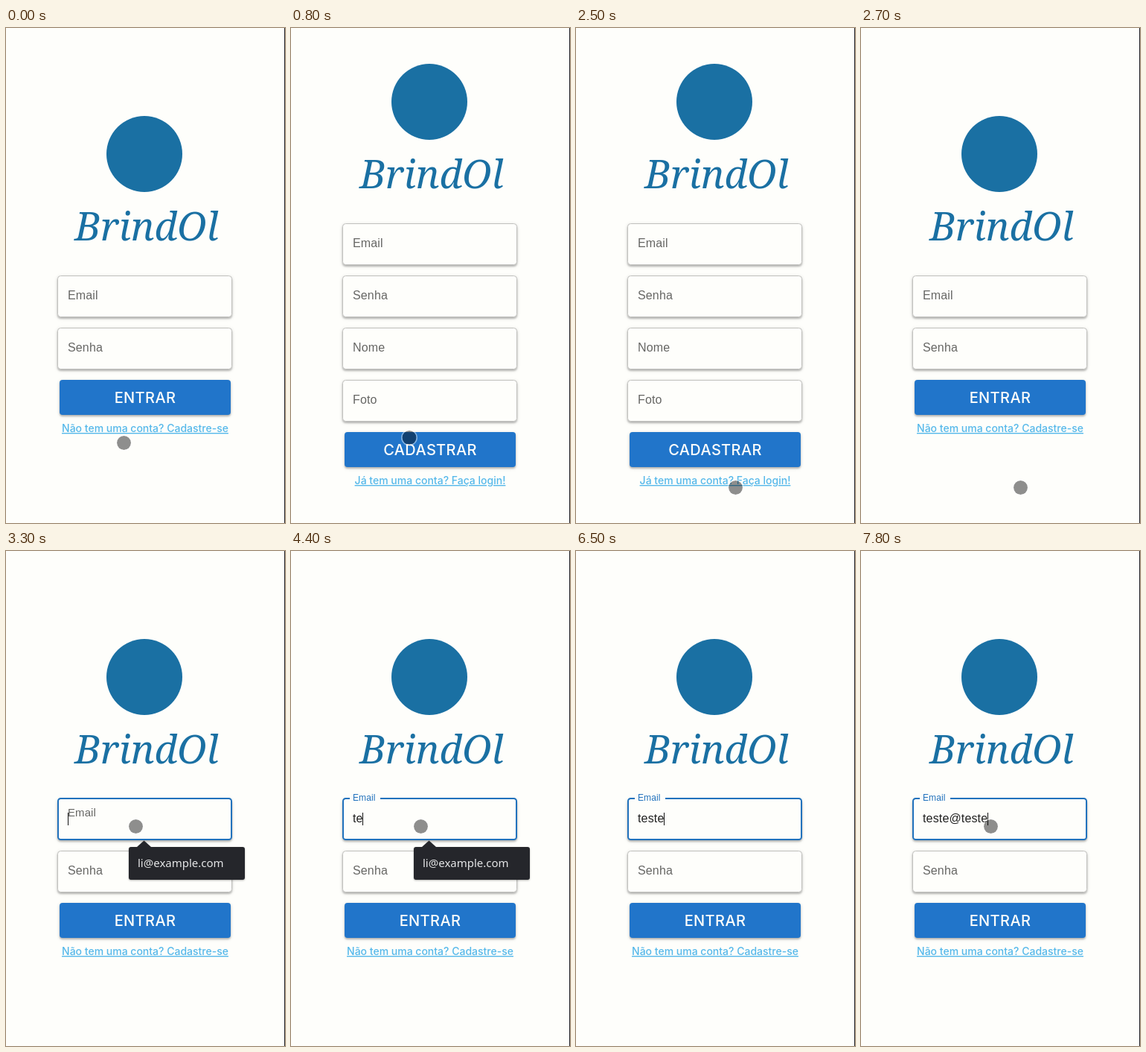
An HTML page for the animation above (8 s loop, 375 px wide and 664 px high).

```html
<!DOCTYPE html>
<html lang="pt-BR">
<head>
<meta charset="utf-8">
<title>Login</title>
<style>
  html, body { margin: 0; width: 100%; height: 100%; overflow: hidden; background: #fefefb; }
  svg { display: block; }
  text { white-space: pre; }
  .mark { fill: #1a70a3; }
  .brand { font: italic 53px 'Noto Serif', serif; fill: #1a70a3; text-anchor: middle; }
  .label, .typed { font: 16px 'Liberation Sans', Arial, sans-serif; letter-spacing: .15px; }
  .label { fill: #666664; }
  .typed { fill: #212121; }
  .field, .button rect { filter: drop-shadow(0 2px 1px rgba(0,0,0,.22)) drop-shadow(0 1px 2px rgba(0,0,0,.14)); }
  .field { fill: #fefefb; stroke: #c1c1be; }
  .button rect { fill: #2175ca; }
  .button text { font: 500 20px Inter, sans-serif; letter-spacing: .4px; fill: #fefefb; text-anchor: middle; }
  .link { font: 500 14px Inter, sans-serif; fill: #55b8ea; text-anchor: middle; text-decoration: underline 1px; text-underline-offset: 1px; }
  .popup { fill: #25262b; filter: drop-shadow(0 1px 1px rgba(0,0,0,.3)); }
  .hint { font: 15px 'Noto Sans', sans-serif; fill: #e4e5e6; }
</style>
</head>
<body>
<svg width="375" height="664" viewBox="0 0 375 664">
  <g id="login"></g>
  <g id="signup"></g>
  <g id="focus">
    <rect x="70" y="332" width="233" height="55" rx="3.5" fill="none" stroke="#2172bd" stroke-width="2"/>
    <rect id="notch" x="79" y="330" width="41" height="4" fill="#fefefb"/>
  </g>
  <text id="email" class="label">Email</text>
  <text id="typed" class="typed" x="83" y="364"></text>
  <rect id="caret" y="351" width="1" height="17" fill="#111"/>
  <g id="popup">
    <path class="popup" d="M168 397H176L185.500 388.500L195 397H318a3 3 0 0 1 3 3V438a3 3 0 0 1-3 3H168a3 3 0 0 1-3-3V400a3 3 0 0 1 3-3Z"/>
    <text class="hint" x="177" y="424">li@example.com</text>
  </g>
  <g id="pointer">
    <circle r="9.500" fill="rgba(0,0,0,.44)"/>
    <circle r="10.200" fill="none" stroke="rgba(255,255,255,.45)" stroke-width="1.500"/>
  </g>
  <rect x="374" width="1" height="664" fill="#24242a"/>
</svg>
<script>
const LOOP = 8000, STEP = 100, FOCUS = 3280, BLINK = 600;
const $ = id => document.getElementById(id);

function form(top, labels, action, link) {
  const rowY = i => top + 214 + i * 70;
  const fields = labels.map((label, i) =>
    `<rect class="field" x="69.5" y="${rowY(i) + .5}" width="234" height="55" rx="4"/>
     <text class="label" x="83" y="${rowY(i) + 32}">${label}</text>`).join('');
  const y = rowY(labels.length);
  return `<circle class="mark" cx="186" cy="${top + 51}" r="51"/>
    <text class="brand" x="189" y="${top + 167}">BrindOl</text>
    ${fields}
    <g class="button">
      <rect x="72" y="${y}" width="230" height="47" rx="4"/>
      <text x="187" y="${y + 31}">${action}</text>
    </g>
    <text class="link" x="187" y="${y + 70}">${link}</text>`;
}

// The login form's email label moves, so it is kept outside the form.
$('login').innerHTML = form(118, ['', 'Senha'], 'ENTRAR', 'Não tem uma conta? Cadastre-se');
$('signup').innerHTML = form(48, ['Email', 'Senha', 'Nome', 'Foto'], 'CADASTRAR', 'Já tem uma conta? Faça login!');

const moves = [
  { start: 500, steps: 1, to: [159, 549.5] },
  { start: 1300, steps: 1, to: [172, 562] },
  { start: 1500, steps: 3, to: [154, 258] },
  { start: 1800, steps: 1, to: [176, 445] },
  { start: 2000, steps: 3, to: [212, 583] },
  { start: 2400, steps: 2, to: [214.5, 616.5] },
  { start: 2900, steps: 4, to: [174.5, 369.5] }
];
const bursts = [
  { text: 'teste', start: 4250, gap: 150 },
  { text: '@', start: 6800, gap: 0 },
  { text: 'teste', start: 7020, gap: 180 }
];
const keys = bursts.flatMap(({ text, start, gap }) =>
  [...text].map((char, i) => ({ char, time: start + i * gap })));

const clamp = v => Math.min(1, Math.max(0, v));
const easeOut = p => 1 - (1 - p) ** 3;
const mix = (a, b, k) => a.map((v, i) => v + (b[i] - v) * k);
const show = (id, on) => { $(id).style.display = on ? '' : 'none'; };

function pointerAt(t) {
  return moves.reduce((pos, { start, steps, to }) =>
    mix(pos, to, clamp((t - start + STEP) / (steps * STEP))), [158.5, 556.5]);
}

function draw(t) {
  const signup = t >= 700 && t < 2700;
  const focused = t >= FOCUS;
  show('signup', signup);
  show('login', !signup);
  show('email', !signup);
  show('focus', focused);

  const lift = easeOut(clamp((t - FOCUS) / 200));
  const floating = lift > .5;
  show('notch', floating);
  $('email').setAttribute('transform', `translate(83 ${364 - 29 * lift}) scale(${1 - .25 * lift})`);
  $('email').style.fill = floating ? '#2172bd' : '';

  const pressed = keys.filter(key => key.time <= t);
  const typed = $('typed');
  typed.textContent = pressed.map(key => key.char).join('');
  const width = pressed.length ? typed.getComputedTextLength() : 0;
  const lastInput = pressed.at(-1)?.time ?? FOCUS;
  $('caret').setAttribute('x', Math.floor(83 + width));
  show('caret', focused && (t - lastInput) % (2 * BLINK) < BLINK);

  show('popup', focused);
  $('popup').style.opacity = clamp((4700 - t) / 300);
  $('pointer').setAttribute('transform', `translate(${pointerAt(t)})`);
  show('pointer', t < 6500 || t >= 6700);
}

const begin = performance.now();
function tick() {
  const t = (performance.now() - begin) % LOOP;
  draw(Math.floor(t / STEP) * STEP);
  requestAnimationFrame(tick);
}
tick();
</script>
</body>
</html>
```
